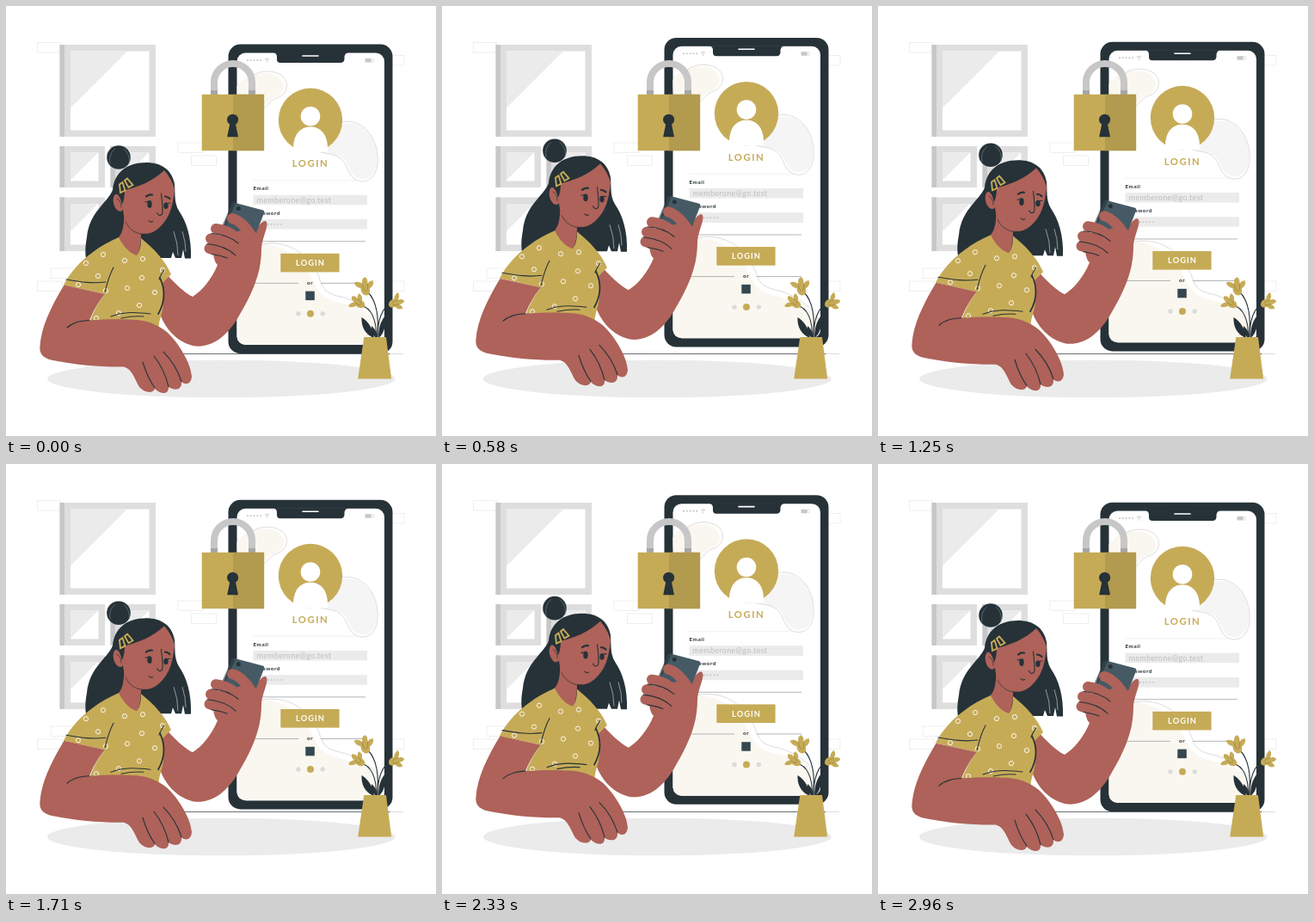
Animation of 500 by 500 pixels, one loop 3 s. Source, as an HTML page:

```html
<!DOCTYPE html>
<html lang="en">
<head>
<meta charset="utf-8">
<title>Login illustration</title>
<style>
  html, body { margin: 0; width: 100%; height: 100%; overflow: hidden; background: #fff; }
  svg { display: block; width: 100vw; height: 100vh; font-family: Lato, "Open Sans", sans-serif; }
  .gold { fill: #c6ab57; }
  .dark { fill: #263238; }
  .skin { fill: #ae6259; }
  .white { fill: #fff; }
  .pale { fill: #ebebeb; }
  .grey { fill: #c7c7c7; }
  .cream { fill: #faf7f0; }
  .ink { fill: none; stroke: #263238; stroke-width: 1.1; stroke-linecap: round; stroke-linejoin: round; }
  .thin { fill: none; stroke: #d3d3d3; stroke-width: .8; }
  .rule { fill: none; stroke: #90979a; stroke-width: .7; }
  .finger { fill: none; stroke: #ae6259; stroke-linecap: round; stroke-width: 12; }
  .bold { font-weight: 700; }
  .mid { text-anchor: middle; }
</style>
</head>
<body>
<svg viewBox="0 0 500 500">
  <defs>
    <clipPath id="screen"><rect x="268.5" y="54.5" width="171.5" height="339.5" rx="10"/></clipPath>
    <g id="flower">
      <path class="gold" d="M0,1C-5,0 -6,-5 -5,-9C-8,-10 -11,-14 -11,-17C-7,-18 -4,-16 -2,-13C-2,-17 0,-20 3,-20C5,-18 5,-15 4,-12C6,-14 9,-15 11,-14C11,-9 8,-7 5,-6C5,-2 3,1 0,1Z"/>
      <path d="M-1,-4Q-3,-8 -2,-13M1,-4Q4,-8 4,-12" fill="none" stroke="#8f7b3d" stroke-width=".6"/>
    </g>
  </defs>

  <g id="wall"></g>
  <path class="ink" style="stroke-width:.7" d="M185,404.5H446"/>
  <path class="thin" d="M447,404.500H462"/>
  <ellipse class="pale" cx="250.3" cy="433.5" rx="202.3" ry="21.8"/>

  <g class="float">
    <rect class="dark" x="258.5" y="44.6" width="191" height="359.6" rx="14"/>
    <g clip-path="url(#screen)">
      <rect class="white" x="268" y="54" width="173" height="341"/>
      <path class="cream" d="M268,94C278,77 306,75 316,82C327,90 324,103 312,107C301,110 303,121 286,122C270,124 268,112 268,94Z"/>
      <path class="thin" d="M282,86C290,74 312,73 322,82C330,90 327,103 315,107C303,111 305,121 288,123"/>
      <path d="M391,137C412,132 429,149 431,172C433,194 424,201 414,201C400,200 400,186 392,177C382,170 364,174 352,165Z" fill="#f5f5f5"/>
      <path class="thin" d="M390,135C412,130 430,149 432,174C434,198 421,207 409,203C396,198 399,185 389,177C380,170 366,173 355,165"/>
      <path class="cream" d="M268,279C305,271 334,283 348,303C359,320 359,334 380,343C404,349 428,353 440,378V395H268Z"/>
      <path class="thin" d="M288,279C320,270 342,282 356,301C370,319 362,331 385,337C410,342 428,356 440,374"/>
    </g>
    <path class="dark" d="M311,54H398Q394,55 393.5,59V62Q393,66 389,66H319Q315,66 315,62V59Q315,55 311,54Z"/>
    <path d="M345,58H363" stroke="#fff" stroke-width="1.6" stroke-linecap="round"/>
    <path d="M281,63H298" stroke="#c7c7c7" stroke-width="2.1" stroke-linecap="round" stroke-dasharray="0 3.8"/>
    <path d="M301,62Q303.5,60 306,62M302.3,63.5Q303.5,62.5 304.7,63.5" fill="none" stroke="#c7c7c7"/>
    <circle class="grey" cx="303.5" cy="65" r=".7"/>
    <rect class="grey" x="417.5" y="61" width="7" height="4.5" rx="1"/>
    <rect x="424.5" y="61.3" width="2.6" height="3.9" rx=".8" fill="none" stroke="#c7c7c7" stroke-width=".6"/>

    <circle class="gold" cx="354" cy="132.8" r="37.2"/>
    <circle class="white" cx="354" cy="128.3" r="11.3"/>
    <path class="white" d="M334,170C333,148 343,140.5 354,140.5S375,148 374,170Z"/>
    <text class="gold bold mid" x="354" y="187.3" font-size="11.3" letter-spacing="1.5">LOGIN</text>
    <path d="M287,203H412" stroke="#ebebeb" stroke-width=".7"/>

    <g class="dark bold" font-size="6.4" letter-spacing=".5">
      <text x="287.5" y="214.4">Email</text>
      <text x="287.5" y="242.8">Password</text>
      <text class="mid" x="353.5" y="323.8">or</text>
    </g>
    <path d="M287.5,225.5H420M287.5,253.8H420" stroke="#ebebeb" stroke-width="11.6"/>
    <text x="291.5" y="228.7" font-size="9" letter-spacing=".3" fill="#bdbdbd">memberone@go.test</text>
    <path d="M293,253.8H322" stroke="#bdbdbd" stroke-width="1.7" stroke-linecap="round" stroke-dasharray="0 3.9"/>
    <path class="rule" d="M287,273.7H418M287,322.3H340M366,322.3H418"/>
    <rect class="gold" x="319.3" y="287.8" width="68.3" height="21.6"/>
    <text class="white bold mid" x="354" y="302" font-size="9.3" letter-spacing="1">LOGIN</text>
    <rect x="348.3" y="331.6" width="10.5" height="10.5" fill="#37474f"/>
    <circle cx="340" cy="357.8" r="2.7" fill="#dbdbdb"/>
    <circle class="gold" cx="354" cy="357.8" r="4"/>
    <circle cx="368.3" cy="357.8" r="2.7" fill="#dbdbdb"/>
  </g>

  <g id="lock">
    <path d="M242,103V89A22,22 0 0 1 286,89V103" fill="none" stroke="#c7c7c7" stroke-width="8"/>
    <path d="M242,98V103M286,98V103" stroke="#a6a6a6" stroke-width="8"/>
    <rect class="gold" x="227.7" y="102.8" width="72.4" height="65.4"/>
    <rect x="264" y="102.8" width="36.1" height="65.4" fill="#b29a4e"/>
    <circle class="dark" cx="263.6" cy="132.2" r="6.5"/>
    <path class="dark" d="M260.5,136H266.7L270,152.2H257.2Z"/>
  </g>

  <g id="plant">
    <path class="ink" d="M431,386C435,362 430,342 421,333M430,386C432,364 423,350 414,349M432,386C432,366 437,350 448,346"/>
    <path class="dark" d="M428,386C417,382 413,372 413.5,362C422,367 427,376 428,386ZM433,386C433,374 436,366 441,360C442,371 440,381 433,386ZM430,386C426,382 425,377 425,372C430,376 432,381 430,386Z"/>
    <use href="#flower" transform="translate(419.5 335.5) rotate(-14)"/>
    <use href="#flower" transform="translate(416 349) rotate(-58) scale(.88)"/>
    <use href="#flower" transform="translate(446 348) rotate(66) scale(.88)"/>
    <path class="gold" d="M416.3,385H442L448.2,433.5H409.2Z"/>
  </g>

  <g class="float">
    <!-- hair behind the face -->
    <circle class="dark" cx="131" cy="176" r="13.8"/>
    <path d="M121,184Q119,172 127,166M137,166Q145,173 143,184" fill="none" stroke="#87919a" stroke-width=".5"/>
    <path class="dark" d="M163,182C140,182 126,194 124,214C118,229 97,239 94,269C92,280 92,286 93,293H192L194,286L197,293H204L206,283L208,293.5H215C216,270 210,251 201,238C195,228 197,217 196,207C193,190 180,182 163,182Z"/>
    <path d="M195,262Q200,276 200,290M205,262Q209,274 209,286" fill="none" stroke="#fff" stroke-width=".5"/>

    <!-- raised arm -->
    <path class="skin" d="M180,304C196,323 207,333 217,338C228,331 239,318 246,301C238,292 240,274 253,263L270,268L289,264C293,256 298,249 302,250C307,254 298,268 297,282C297,314 284,338 270,362C257,384 240,397 220,395.5C200,392 184,376 177,352Z"/>
    <path d="M265,228.5L299,237.5Q301,238.5 300,241L290,266H250L262,231Q263,228.5 265,228.5Z" fill="#455a64"/>
    <path class="dark" d="M264,228.5L267,229.5L253,261H249L262,231Z" opacity=".65"/>
    <circle class="dark" cx="270.3" cy="235.5" r="2.5"/>
    <path class="finger" d="M263,247C272,249 282,260 288,272M244,259C255,260 264,265 272,274M238,270.500C250,272 260,277 268,284M236.5,282C248,285 257,288 264,294M249,295L262,298"/>
    <path class="skin" d="M248,268L284,258L297,270L294,308L246,301Z"/>
    <path class="ink" d="M239,264.5C252,265 263,270 270,276M234,276.5C248,278 260,283 267,290M239,288.5C248,290 252,291 257,293"/>

    <!-- face and neck -->
    <path class="skin" d="M137,236C138,254 136,264 130,270C138,284 147,291 152,291C155,286 157,277 157,264Z"/>
    <path class="skin" d="M184,191C170,202 152,210 137,214C134,232 136,248 143,257C153,268 168,267 178,258C190,247 194,234 196,213C194,205 190,198 184,191Z"/>
    <ellipse class="skin" cx="131" cy="228.5" rx="6" ry="10.5" transform="rotate(-14 131 228.5)"/>
    <path class="ink" style="stroke-width:.7" d="M129,224Q134,226 134,234M139,251C144,262 154,266 163,265"/>
    <path class="dark" d="M184,191C172,203 153,211 138,214C138,221 137,226 135,231C133,222 130,217 125,219C126,199 140,184 163,183Z"/>
    <path d="M141,200.5L147.5,208L142.5,211L138,203ZM135.5,205L138.5,214.5L133,217L132,207.5Z" fill="none" stroke="#c6ab57" stroke-width="1.9"/>
    <ellipse class="dark" cx="167" cy="230.5" rx="2.7" ry="4.4"/>
    <ellipse class="dark" cx="186" cy="232.3" rx="2.7" ry="3.8"/>
    <path class="ink" d="M162,228L167,227M187,229.5L191,229M180.5,218C181.500,228 183,237 181.5,242M181,242.500Q178,245 175.5,240.500M166,249.5Q168,252 170.5,250.5"/>
    <path class="ink" style="stroke-width:2.2" d="M163,221.5Q166,219 170,219.5M185,221.5Q188,221.5 190.5,224"/>

    <!-- shirt -->
    <path class="gold" d="M131,269C109,278 91,293 82,303C75,311 70,318 67,324.5L115,335C107,345 101,356 97,368L178,379C176,367 182,360 183,347C184,337 183,329 182,322L192,312C186,297 172,282 157,270C157,278 156,285 152,290C145,288 137,281 131,269Z"/>
    <g id="dots" fill="none" stroke="#fff" stroke-width=".9"></g>
    <path class="ink" d="M125,304C119,315 117,325 115,333M70,318C88,321 101,323 116,321M184,307C181,311 179,314 178,318M122,361C138,355 152,356 168,358M134,363Q148,360 160,361"/>
    <path class="ink" style="stroke-width:1.7" d="M179,316C186,331 185,344 177,358"/>

    <!-- resting arm -->
    <path class="skin" d="M67.5,324.6L115,335C106,346 101,356 97,365.5C116,364 137,364 152,365C167,366 180,373 187,379C201,392 215,415 216,431C215,440 209,441 204,437C205,446 197,448 189,443C190,452 180,452 173,445C171,451 161,450 155,443C150,435 147,422 137,419.5C110,420 80,417 60,413C45,411 38,406 39.5,395C41,374 52,350 67.5,324.6Z"/>
    <path class="ink" d="M71,374C79,367 88,366 97,365.5M159,414C163,427 167,436 173,444M172,407C180,417 186,430 189,442.5M183,402C192,411 200,424 204,436.5"/>
  </g>
</svg>
<script>
  const PERIOD = 1500, RISE = 10, LEAD = 20, REST = .3;
  const byId = id => document.getElementById(id);
  const box = (x, y, w, h, fill) => `<rect x="${x}" y="${y}" width="${w}" height="${h}" fill="${fill}"/>`;

  // Framed pane with a shaded left side and a slanted reflection
  function pane(x, y, w, h, glare) {
    const gx = x + 12.5, gy = y + 7.5;
    return box(x, y, w, h, '#dedede') + box(x, y, 5.5, h, '#c7c7c7') +
      box(gx, gy, w - 20, h - 15, '#fff') +
      `<path class="pale" d="M${gx},${gy}h${glare}l${-glare},${glare}z"/>`;
  }

  const bricks = [[36.5, 42.5, 27], [200, 159, 29], [215.5, 174, 29], [52, 305, 29],
    [36.5, 320, 29], [434, 57.5, 29], [434, 320, 29]];
  byId('wall').innerHTML =
    bricks.map(([x, y, w]) => `<rect class="thin" style="stroke:#ebebeb" x="${x}" y="${y}" width="${w}" height="11.5"/>`).join('') +
    pane(62.5, 45, 111.5, 107, 66) + pane(62.5, 163, 52.5, 48, 32) +
    pane(121.5, 163, 52.5, 48, 32) + pane(62.5, 222.5, 52.5, 62.5, 32);

  const dots = [[113, 289], [93, 299], [107, 314], [84, 324], [138, 296], [159, 294], [182, 307],
    [158, 316], [173, 333], [141, 328], [116, 331], [155, 348], [131, 357], [105, 363]];
  byId('dots').innerHTML = dots.map(([x, y]) => `<circle cx="${x}" cy="${y}" r="2.6"/>`).join('');

  // Linear bob: up for half the period, down for the other half
  const floats = document.querySelectorAll('.float');
  const start = performance.now();
  function draw() {
    const phase = (performance.now() - start + LEAD) % PERIOD / PERIOD;
    const y = REST - RISE * (1 - Math.abs(1 - 2 * phase));
    floats.forEach(g => g.setAttribute('transform', `translate(0 ${y})`));
    requestAnimationFrame(draw);
  }
  draw();
</script>
</body>
</html>
```
